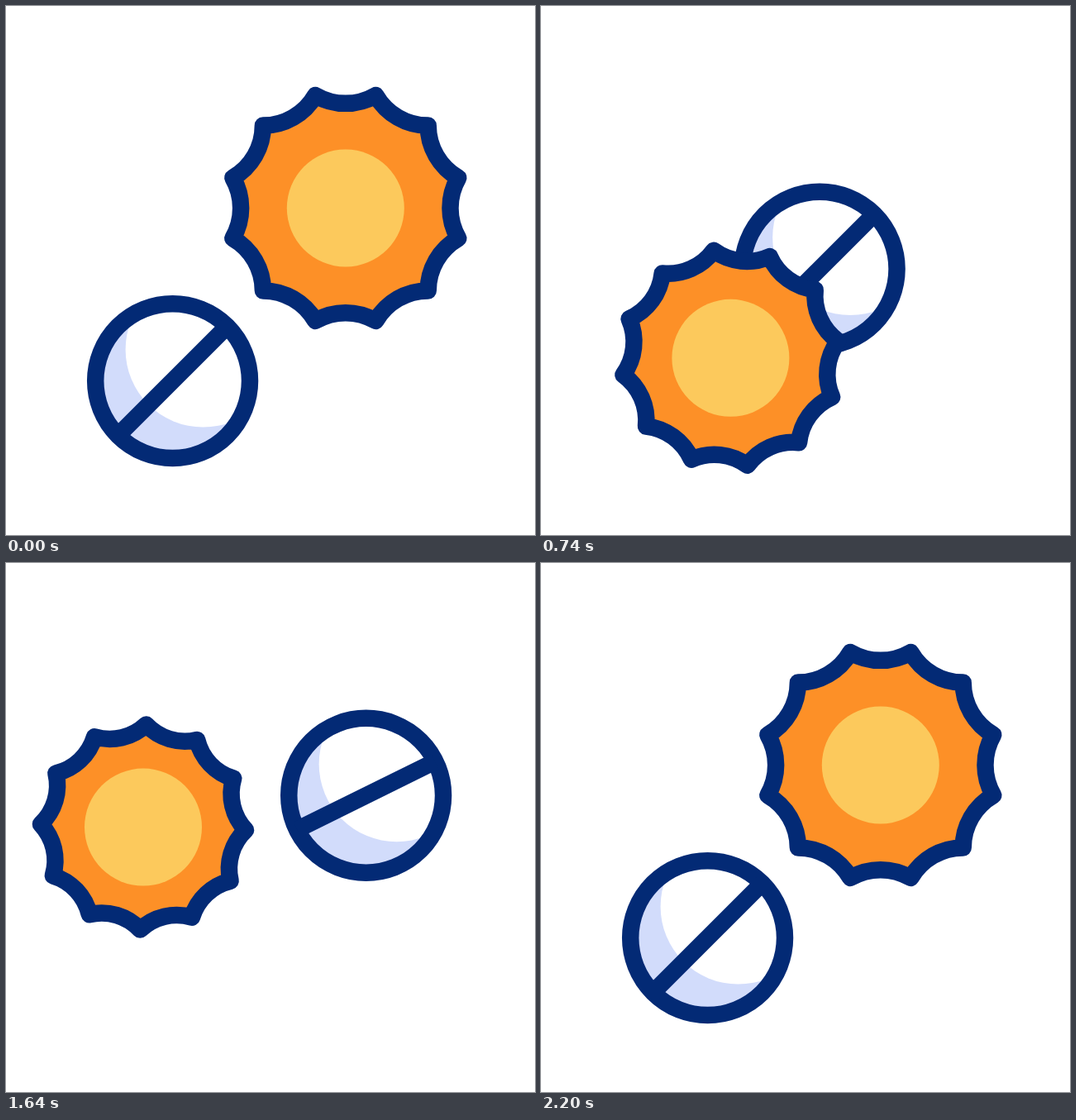
An HTML page with a canvas for the animation above (2400 ms loop, 640 px wide and 640 px high).

```html
<!DOCTYPE html>
<html lang="en">
<head>
<meta charset="utf-8">
<title>Sun and moon</title>
<style>
  html, body { margin: 0; width: 100%; height: 100%; overflow: hidden; background: #fff; }
  canvas { display: block; width: 640px; height: 640px; }
</style>
</head>
<body>
<canvas id="stage"></canvas>
<script>
const LOOP = 2400, STEP = 20;
const NAVY = '#032a75', ORANGE = '#fd9027', YELLOW = '#fcc95c', LILAC = '#d2dcfb';
const LINE = 20.5, TAU = Math.PI * 2;
const UPPER = [410.8, 244.5], LOWER = [201.6, 453.6];

const canvas = document.getElementById('stage');
const ctx = canvas.getContext('2d');
const ratio = window.devicePixelRatio || 1;
canvas.width = canvas.height = 640 * ratio;

const mix = (a, b, k) => a + (b - a) * k;
const mixPoint = (a, b, k) => [mix(a[0], b[0], k), mix(a[1], b[1], k)];

// Eased progress of time t between two moments
function ease(t, from, to) {
  const u = Math.min(1, Math.max(0, (t - from) / (to - from)));
  return u * u * (3 - 2 * u);
}

// Cubic curve that is walked by its length
function curve(a, b, c, d) {
  const n = 240, pts = [], len = [0];
  for (let i = 0; i <= n; i++) {
    const t = i / n, s = 1 - t;
    pts.push([0, 1].map(k =>
      s * s * s * a[k] + 3 * s * s * t * b[k] + 3 * s * t * t * c[k] + t * t * t * d[k]));
    if (i) len.push(len[i - 1] + Math.hypot(pts[i][0] - pts[i - 1][0], pts[i][1] - pts[i - 1][1]));
  }
  return k => {
    const want = k * len[n];
    let i = 1;
    while (i < n && len[i] < want) i++;
    return mixPoint(pts[i - 1], pts[i], (want - len[i - 1]) / (len[i] - len[i - 1]));
  };
}

const sunArc = curve(LOWER, [69, 321], [285, 111], UPPER);
const moonArc = curve(UPPER, [529.5, 378], [337, 543], LOWER);

function disc(x, y, r, color) {
  ctx.beginPath();
  ctx.arc(x, y, r, 0, TAU);
  ctx.fillStyle = color;
  ctx.fill();
}

function drawMoon([x, y], turn) {
  ctx.save();
  ctx.translate(x, y);
  ctx.save();
  disc(0, 0, 93.4, LILAC);
  ctx.clip();
  disc(37, -38, 94, '#fff');
  ctx.restore();
  ctx.beginPath();
  ctx.arc(0, 0, 93.4, 0, TAU);
  ctx.stroke();
  ctx.rotate(turn - Math.PI / 4);
  ctx.beginPath();
  ctx.moveTo(-93, 0);
  ctx.lineTo(93, 0);
  ctx.stroke();
  ctx.restore();
}

function drawSun([x, y], turn, r) {
  const bend = r * 73 / 141.3;
  let d = '';
  for (let i = 0; i < 12; i++) {
    const a = turn + (i + 0.5) * TAU / 12;
    const p = `${r * Math.cos(a)} ${r * Math.sin(a)}`;
    d += i ? `A${bend} ${bend} 0 0 0 ${p}` : `M${p}`;
  }
  const a = turn + TAU / 24;
  d += `A${bend} ${bend} 0 0 0 ${r * Math.cos(a)} ${r * Math.sin(a)}Z`;
  const body = new Path2D(d);
  ctx.save();
  ctx.translate(x, y);
  ctx.fillStyle = ORANGE;
  ctx.fill(body);
  ctx.stroke(body);
  disc(0, 0, 71, YELLOW);
  ctx.restore();
}

function draw(t) {
  ctx.setTransform(ratio, 0, 0, ratio, 0, 0);
  ctx.fillStyle = '#fff';
  ctx.fillRect(0, 0, 640, 640);
  ctx.strokeStyle = NAVY;
  ctx.lineWidth = LINE;
  ctx.lineJoin = 'round';

  let sun, moon, sunTurn, moonTurn = 0, shrink;
  if (t < 1200) {
    const k = ease(t, 200, 900);
    sun = mixPoint(UPPER, LOWER, k);
    moon = mixPoint(LOWER, UPPER, ease(t, 200, 1100));
    sunTurn = k;
    shrink = ease(t, 200, 500) - ease(t, 500, 1000);
  } else {
    const k = ease(t, 1500, 2200);
    sun = sunArc(ease(t, 1300, 2200));
    moon = moonArc(k);
    sunTurn = ease(t, 1360, 2200);
    moonTurn = k;
    shrink = ease(t, 1300, 1700) - ease(t, 1700, 2100);
  }
  drawMoon(moon, moonTurn * Math.PI);
  drawSun(sun, sunTurn * Math.PI, 141.3 - 18.3 * shrink);
}

const start = performance.now();
function tick() {
  const t = (performance.now() - start) % LOOP;
  draw(Math.floor(t / STEP) * STEP);
  requestAnimationFrame(tick);
}
tick();
</script>
</body>
</html>
```
